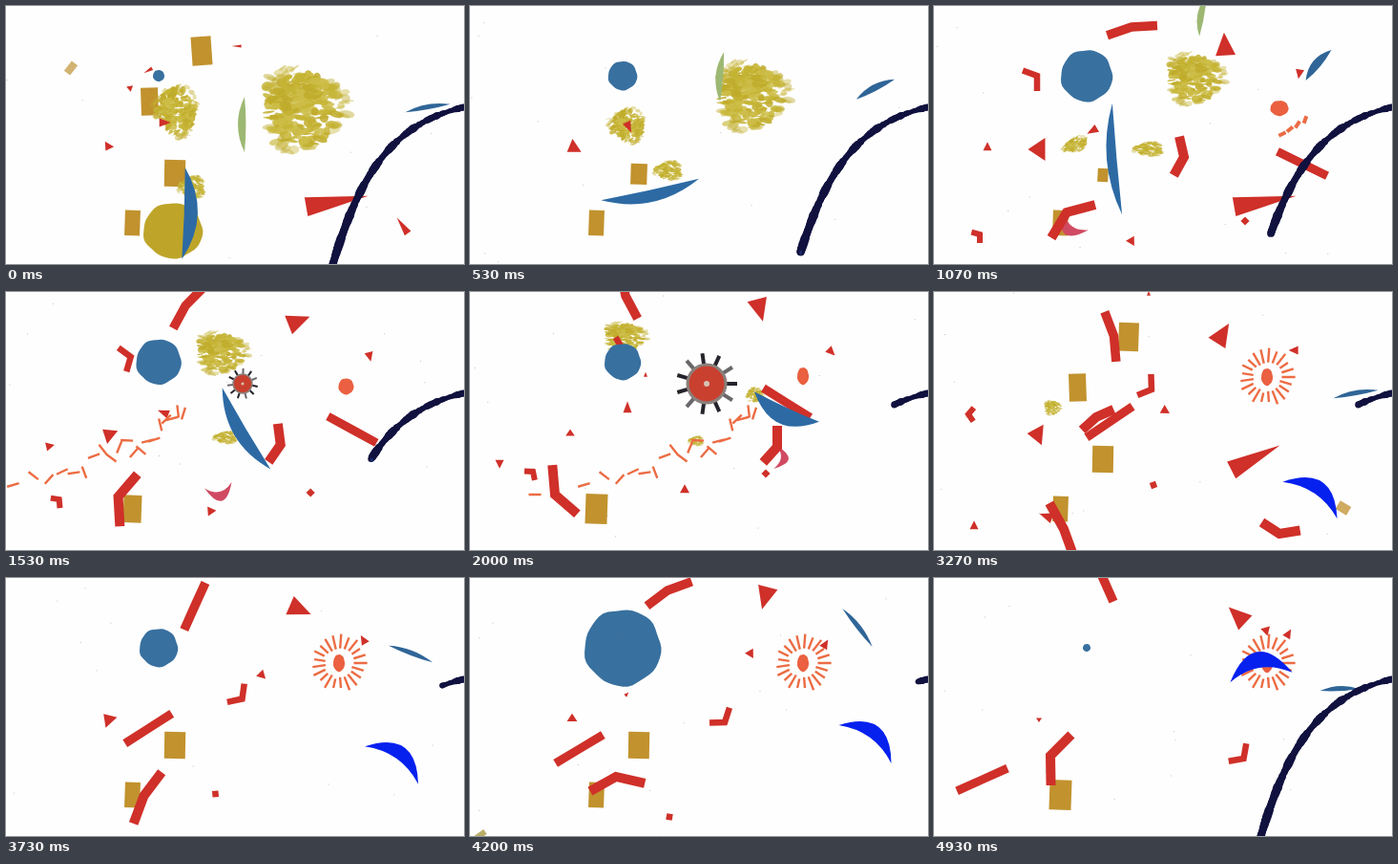
These frames come from a looping animation (480 by 270 pixels, 4990 ms). An HTML page with a canvas:

```html
<!DOCTYPE html>
<html lang="en">
<head>
<meta charset="utf-8">
<title>Paper cut-outs</title>
<style>
html, body { margin: 0; width: 100%; height: 100%; overflow: hidden; background: #fefefe; }
canvas { display: block; width: 480px; height: 270px; }
</style>
</head>
<body>
<canvas id="stage" width="480" height="270"></canvas>
<script>
const ctx = document.getElementById('stage').getContext('2d');
const LOOP = 4990, STEPS = 75, POP = 6, TAU = Math.PI * 2, DEG = Math.PI / 180;
const BEATS = [0, 16, 30, 38, 49, 63, 74];
const RED = '#cf3029', GOLD = '#c1922e', BLUE = '#38709f', INK = '#11123f';
const YELLOWS = ['#c6b434', '#bfab2c', '#cdbd48'];

const mix = (a, b, u) => a + (b - a) * u;
const clamp = u => Math.min(1, Math.max(0, u));

function random(seed) {
  return () => (seed = (seed * 16807) % 2147483647) / 2147483647;
}

// Pose on a step. Outside its beats a piece drifts on while it grows or shrinks.
function poseAt(first, poses, step) {
  const times = BEATS.slice(first, first + poses.length), n = times.length;
  const away = Math.max(times[0] - step, step - times[n - 1], 0);
  if (away >= POP) return null;
  let i = 0;
  while (i < n - 2 && times[i + 1] <= step) i++;
  const j = Math.min(i + 1, n - 1);
  const u = j > i ? (step - times[i]) / (times[j] - times[i]) : 0;
  const v = poses[i].map((a, k) => mix(a, poses[j][k], k < 2 ? u : clamp(u)));
  return { v, size: 1 - away / POP };
}

const layers = [];

// Every pose starts with x, y, angle; the rest goes to the shape.
function add(first, poses, shape) {
  layers.push(step => {
    const p = poseAt(first, poses, step);
    if (!p) return;
    const [x, y, angle, ...rest] = p.v;
    ctx.save();
    ctx.translate(x, y);
    ctx.rotate(angle * DEG);
    ctx.scale(p.size, p.size);
    shape(...rest);
    ctx.restore();
  });
}

function strip(half, wide, first, poses) {
  add(first, poses, bend => {
    const a = (180 - bend) * DEG;
    ctx.strokeStyle = RED;
    ctx.lineWidth = wide;
    ctx.beginPath();
    ctx.moveTo(half * Math.cos(a), half * Math.sin(a));
    ctx.lineTo(0, 0);
    ctx.lineTo(half, 0);
    ctx.stroke();
  });
}

function triangle(base, height, first, poses) {
  add(first, poses, (size = 1) => {
    ctx.fillStyle = RED;
    ctx.beginPath();
    ctx.moveTo(height * 0.64 * size, 0);
    ctx.lineTo(-height * 0.36 * size, base / 2 * size);
    ctx.lineTo(-height * 0.36 * size, -base / 2 * size);
    ctx.fill();
  });
}

function card(color, w, h, first, poses) {
  add(first, poses, (size = 1) => {
    ctx.fillStyle = color;
    ctx.fillRect(-w / 2 * size, -h / 2 * size, w * size, h * size);
  });
}

// Curved sliver between two tips; thick is a share of the outer bend.
function sliver(color, thick, first, poses) {
  add(first, poses, (length, bend) => {
    ctx.fillStyle = color;
    ctx.beginPath();
    ctx.moveTo(-length / 2, 0);
    ctx.quadraticCurveTo(0, -bend, length / 2, 0);
    ctx.quadraticCurveTo(0, bend * (thick - 1), -length / 2, 0);
    ctx.fill();
  });
}

function disc(color, first, poses) {
  add(first, poses, (rx, ry = rx) => {
    ctx.fillStyle = color;
    ctx.beginPath();
    for (let i = 0; i < 48; i++) {
      const t = i / 48 * TAU, r = 1 + 0.02 * Math.sin(5 * t) + 0.012 * Math.cos(9 * t);
      ctx.lineTo(rx * r * Math.cos(t), ry * r * Math.sin(t));
    }
    ctx.fill();
  });
}

// Dabs of paint: dense in the middle, thin and feathered at the rim.
function paint(seed, first, poses) {
  add(first, poses, (rx, ry) => {
    const rnd = random(seed);
    ctx.scale(rx, ry);
    for (let i = 0; i < 260; i++) {
      const t = rnd() * TAU, r = Math.sqrt(rnd()) * (0.86 + 0.12 * Math.sin(t * 3 + seed));
      ctx.globalAlpha = r > 0.75 ? 0.45 : 0.85;
      ctx.fillStyle = YELLOWS[i % 3];
      ctx.beginPath();
      ctx.ellipse(r * Math.cos(t), r * Math.sin(t), 0.06 + rnd() * 0.12, 0.02 + rnd() * 0.08, -0.6 + rnd(), 0, TAU);
      ctx.fill();
    }
  });
}

// Gold cards
card(GOLD, 21, 30, 0, [[205, 47, -4]]);
card(GOLD, 21, 30, 4, [[204, 47, 2]]);
for (const beat of [0, 4]) card(GOLD, 18, 29, beat, [[150.5, 100, -2]]);
card(GOLD, 22, 28, 0, [[177, 175, 1, 1], [177, 177, 3, 0.5]]);
card(GOLD, 22, 28, 3, [[177, 175, 1], [177, 175, 1], [177, 175, 1]]);
add(0, [16, 16, 23, 16, 16, 16, 23].map(w => [132.5, 227, 2, w]), w => {
  ctx.fillStyle = GOLD;
  ctx.fillRect(-w / 2, -8 - w / 3, w, 16 + w * 2 / 3);
});

// Yellow paint
paint(71, 0, [[311, 108, 0, 50, 50], [273, 76, 0, 34, 31], [162, 47, 0, 25, 18], [125, 87, 0, 10, 13], [124, 121, 0, 10, 9]]);
paint(29, 0, [[178, 109, 0, 26, 32], [148, 145, -25, 16, 9]]);
paint(93, 0, [[195, 190, 0, 16, 14], [225, 150, 0, 18, 9], [237, 156, 0, 9, 6]]);
paint(57, 2, [[299, 108, 0, 11, 9]]);
disc('#bea529', 0, [[175, 235, 0, 31, 29]]);

// Pale scraps
card('#d2b371', 8, 13, 0, [[68, 65, 38]]);
card('#cfaa61', 17, 22, 3, [[329, 144, -35, 1], [429, 226, -60, 0.6]]);
card('#b9ae66', 12, 6, 5, [[11, 269, -35]]);
sliver('#9db873', 1.2, 0, [[250, 124, -90, 58, 14], [282, 10, -80, 44, 12]]);
sliver('#d04a62', 0.58, 1, [[149, 224, 219, 33, 38], [320, 173, 98, 24, 28], [206, 222, -84, 30, 80]]);

// Red strips
strip(27, 9.5, 1, [[207, 22, -3, 16], [163, 4, -102, 16], [157.5, 37, -23, 0], [188.5, 46, -111, -16], [207, 13, -20, 17], [177, 0, -114, 0]]);
strip(31, 10, 1, [[139, 216, -15, 44], [89, 212, -95, 44], [96, 253, -38, -36], [136, 248, -119, -9], [153, 208, 13, 42], [122, 186, -45, 46]]);
strip(22, 10, 1, [[262, 158, -103, -42], [322, 162, -90, -42], [355, 200, -44, -42], [362, 253, -9, -42]]);
strip(29, 9, 1, [[386, 165, 26, 0], [332, 116, 32, 0], [271, 97, -8, 0], [184, 136, -34, 0], [114.5, 179, -31, 0], [50.5, 211, -24, 0]]);
strip(16, 6.5, 1, [[108, 73, 90, 70], [161, 61, 128, 70], [193, 80, 140, 70], [228, 102, 158, 70], [267, 151, 178, 70], [324.5, 189, 170, 70]]);
strip(9, 6, 1, [[48, 239, 90, 75], [66, 188, 78, 75], [69, 147, 0, 75], [36, 128, -50, 75]]);
strip(20, 10, 4, [[170, 131, -24, 18]]);

// Red triangles and chips
triangle(21, 24, 1, [[305, 43, -94], [303, 16, 75], [323, 33, 180], [301, 46, 302], [310, 18, 465], [320, 41, 583]]);
triangle(24, 18, 0, [[107, 147, 120, 0.45], [110, 150, 180, 1], [105, 148, 270, 0.4], [110, 152, 265, 0.75], [108, 149, 185, 0.9], [107, 147, 270, 0.45], [110, 148, 450, 0.25]]);
triangle(9, 9, 1, [[56, 148, -90], [31, 179, 90], [32, 214, 90], [42, 245, 270]]);
triangle(10, 9, 1, [[207, 246, 60], [225, 207, -90], [226, 166, -90], [242, 124, 30], [294, 79, 60], [348, 55, 75]]);
triangle(9, 10, 1, [[383, 70, 100], [378, 62, 45], [367, 69, 80], [378, 61, 180], [372, 70, 300], [371, 59, 300]]);
triangle(9, 12, 0, [[165, 122, 0], [167, 130, 150], [165, 122, 270]]);
triangle(4, 5, 2, [[184, 87, -90], [211, 43, -40], [225, 2, -90]]);
triangle(4, 5, 5, [[164, 122, -45]]);
triangle(7, 6, 0, [[130, 86, 80]]);
triangle(4, 10, 0, [[150, 67, 150]]);
triangle(3, 10, 0, [[243, 42, 180]]);
triangle(8, 20, 0, [[417, 232, 235]]);
triangle(18, 38, 3, [[141, 195, -60]]);
triangle(11, 14, 4, [[119, 235, 200]]);
for (const beat of [0, 1]) triangle(20, 66, beat, [[338, 206, -10]]);
triangle(20, 57, 4, [[330, 177, -27]]);
card(RED, 6.5, 6.5, 1, [[326, 225, 45], [310, 190, 45], [272, 182, -15], [230, 202, -20], [209, 250, 10]]);

// Toothed wheel
layers.push(step => {
  const size = clamp(Math.min(step - 19, 36 - step) / POP);
  if (!size) return;
  ctx.save();
  ctx.translate(248, 96);
  ctx.rotate((step - 30) * 0.12);
  ctx.scale(size, size);
  const teeth = 11;
  for (let i = 0; i < teeth; i++) {
    ctx.rotate(TAU / teeth);
    ctx.fillStyle = i % 3 ? '#25232b' : '#6a676b';
    ctx.fillRect(20, -2, 12, 4);
  }
  ctx.fillStyle = '#c9402f';
  ctx.strokeStyle = '#8a807c';
  ctx.lineWidth = 3;
  ctx.beginPath();
  ctx.arc(0, 0, 20, 0, TAU);
  ctx.fill();
  ctx.stroke();
  ctx.fillStyle = '#d8c0b4';
  ctx.beginPath();
  ctx.arc(0, 0, 3, 0, TAU);
  ctx.fill();
  ctx.restore();
});

// Loose dashes drift in along a curve, then gather as rays of the sun
layers.push(step => {
  if (step < 21) return;
  const rnd = random(43), rays = 21;
  const u = clamp((step - 30) / 8), drift = Math.min(0, step - 30) * 14;
  ctx.strokeStyle = '#ec6c44';
  ctx.lineWidth = 2.4;
  ctx.beginPath();
  for (let i = 0; i < rays; i++) {
    const s = Math.sqrt(i / (rays - 1)), turn = rnd() * Math.PI, jitter = (rnd() - 0.5) * 26;
    const x = mix(68, 298, s) + drift, y = 208 - 78 * s * s + jitter;
    const t = i * TAU / rays, near = 14 + 3 * rnd(), far = 26 + 5 * rnd();
    const dx = 6.5 * Math.cos(turn), dy = 6.5 * Math.sin(turn), c = Math.cos(t), k = Math.sin(t);
    ctx.moveTo(mix(x - dx, 349 + c * near, u), mix(y - dy, 89 + k * near, u));
    ctx.lineTo(mix(x + dx, 349 + c * far, u), mix(y + dy, 89 + k * far, u));
  }
  ctx.stroke();
});
disc('#ea6040', 1, [[362, 107, 0, 9.5, 8], [349, 88, 0, 6, 9], [349, 89, 0, 6, 9], [349, 89, 0, 6, 9], [349, 89, 0, 6, 9], [349, 89, 0, 6, 10]]);
for (let i = 0; i < 4; i++) card('#ec6c44', 8, 4, 1, [[365 + i * 8, 134 - i * 5, -25 - i * 15]]);

// Blue paper
disc(BLUE, 0, [6, 27, 19, 41, 0, 40, 4].map(r => [160, 73, 0, r]));
sliver('#2d6aa4', 0.95, 0, [[186, 217, 92, 96, 30], [192, 160, 265, 117, 22], [332, 120, 205, 75, 38]]);
sliver('#2f6597', 1.3, 0, [[442, 107, -10, 48, 8], [403, 62, -50, 42, 14]]);
sliver('#2f6597', 1.3, 3, [[403, 37, 47, 51, 8], [442, 107, -10, 48, 8], [406, 52, 52, 51, 8], [425, 117, -3, 41, 8]]);
sliver('#0621ee', 0.62, 4, [[394, 218, 34, 69, 46], [414, 174, 36, 68, 46], [343, 104, -9, 66, 54]]);

// Ink stroke along one curve, drawn in from the right edge
const bezier = (a, b, c, d, t) => mix(mix(mix(a, b, t), mix(b, c, t), t), mix(mix(b, c, t), mix(c, d, t), t), t);
const reach = [1, 0.87, 0.18, 1, 0.18, 0.06, 1].map(r => [r, 0]);

layers.push(step => {
  const end = poseAt(0, reach, step).v[0], rnd = random(17);
  for (let t = 0; t < end; t += 0.006) {
    const x = bezier(484, 400, 368, 342, t), y = bezier(105, 122, 185, 272, t);
    ctx.fillStyle = INK;
    ctx.beginPath();
    ctx.arc(x, y, 2.5 + t * 1.4 + 0.5 * Math.sin(t * 50) + rnd() * 0.8, 0, TAU);
    ctx.fill();
    if (rnd() > 0.7 && t > 0.3) {
      ctx.fillStyle = t > 0.68 && t < 0.82 ? '#24589f' : '#1d2f78';
      ctx.fillRect(x - 2 + rnd() * 2, y - 1, 2, 4);
    }
  }
});

// Dust on the paper
layers.push(step => {
  const rnd = random(101 + step * 37);
  ctx.fillStyle = 'rgba(110,100,90,0.4)';
  for (let i = 0; i < 12; i++) ctx.fillRect(rnd() * 480, rnd() * 270, 1, 1);
});

function draw(now) {
  const step = Math.floor((now % LOOP) / LOOP * STEPS);
  ctx.fillStyle = '#fefefe';
  ctx.fillRect(0, 0, 480, 270);
  layers.forEach(layer => layer(step));
}

let start = null;
function tick(now) {
  if (start === null) start = now;
  draw(now - start);
  requestAnimationFrame(tick);
}
draw(0);
requestAnimationFrame(tick);
</script>
</body>
</html>
```
